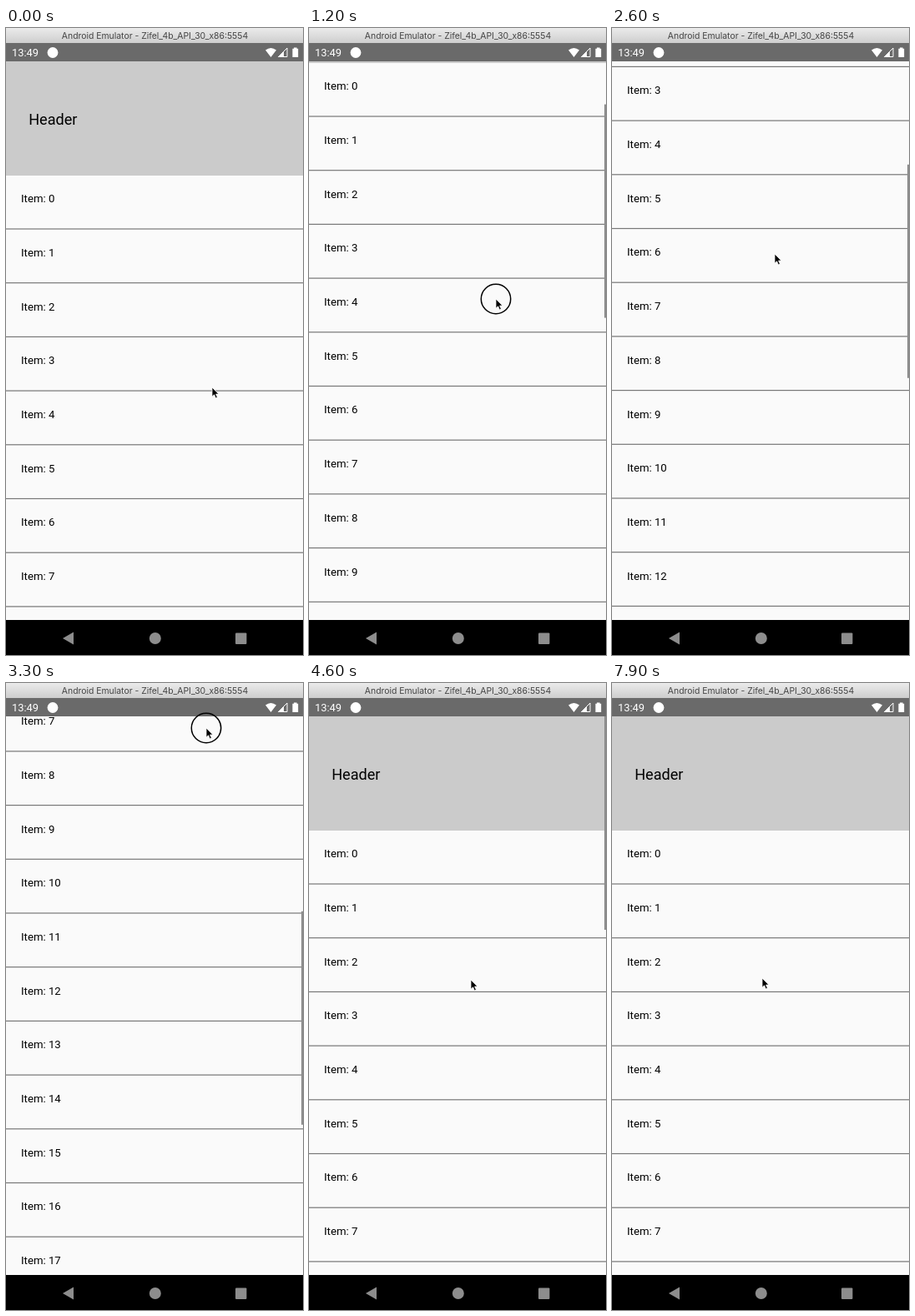
These frames come from a looping animation (356 px wide and 752 px high, 8000 ms). An HTML page:

```html
<!DOCTYPE html>
<html lang="en">
<head>
<meta charset="utf-8">
<title>List with header</title>
<style>
  html, body { margin: 0; width: 100%; height: 100%; overflow: hidden; background: #000; }
  svg { display: block; width: 356px; height: 752px; }
  text { font-family: Roboto, "Open Sans", sans-serif; }
</style>
</head>
<body>
<svg viewBox="0 0 356 752">
  <defs>
    <linearGradient id="chrome" x2="0" y2="1">
      <stop offset="0" stop-color="#ebebeb"/>
      <stop offset="1" stop-color="#cecece"/>
    </linearGradient>
    <clipPath id="view"><rect y="40" width="356" height="670"/></clipPath>
    <filter id="shadow" x="-30%" y="-30%" width="160%" height="160%">
      <feDropShadow dx="0" dy="0.8" stdDeviation="1.2" flood-opacity=".22"/>
    </filter>
  </defs>

  <g clip-path="url(#view)">
    <rect y="40" width="356" height="670" fill="#fafafa"/>
    <g id="content">
      <rect y="40" width="356" height="137" fill="#cbcbcb"/>
      <text x="27.2" y="115.6" font-size="18.1">Header</text>
    </g>
    <rect id="bar" x="354" width="2" height="256" fill="#8e8e8e"/>
    <g id="spinner">
      <circle r="18" fill="#fafafa" filter="url(#shadow)"/>
      <path id="arc" fill="none" stroke="#000" stroke-width="2.3"/>
    </g>
  </g>

  <rect width="356" height="18" fill="url(#chrome)"/>
  <text x="178.5" y="13" font-size="10.4" fill="#444" text-anchor="middle" style="font-family: Inter, sans-serif">Android Emulator - Zifel_4b_API_30_x86:5554</text>

  <rect y="18" width="356" height="22" fill="#6a6a6a"/>
  <g fill="#fff">
    <text x="7" y="34" font-size="12.9">13:49</text>
    <circle cx="56" cy="29.5" r="6.4"/>
    <path d="M317.5 35L311 26.6Q317.5 21.6 324 26.6Z"/>
    <path d="M326.5 34.5L337 24V34.5Z" fill="none" stroke="#fff"/>
    <path d="M326 35L333 28V35Z"/>
    <path d="M345 24.8V23.6h3.6v1.2h1.6V35h-6.8V24.8Z"/>
  </g>

  <rect y="710" width="356" height="42"/>
  <g fill="#8d8d8d">
    <path d="M68 732L81 724.6V739.4Z"/>
    <circle cx="178.8" cy="732" r="7"/>
    <rect x="275" y="725.5" width="13.4" height="13.4" rx="1"/>
  </g>

  <circle id="ring" fill="none" stroke="#000" stroke-width="1.5"/>
  <path id="cursor" d="M0 0V11.2L2.6 8.8L4.4 13L6.4 12.1L4.6 8.1H8Z" stroke="#fff" stroke-width=".8"/>
</svg>

<script>
const LOOP = 8000, STEP = 100, ROW = 64.7, ROWS = 25;
const $ = id => document.getElementById(id);
const set = (el, attrs) => { for (const k in attrs) el.setAttribute(k, attrs[k]); };
const clamp = v => Math.max(0, Math.min(1, v));
const ease = v => v * v * (3 - 2 * v);
const ramp = (t, from, to) => clamp((t - from) / (to - from));

// time, pointer x, pointer y, scroll offset
const track = [
  [300, 247, 431, 0],
  [900, 238, 289, 135],
  [1100, 224, 325, 135],
  [1200, 224, 325, 135],
  [1900, 208, 150, 308],
  [2250, 200, 225, 324],
  [2600, 195, 271, 324],
  [2800, 234, 349, 324],
  [3300, 240, 54, 612],
  [3400, 240, 54, 612],
  [4000, 222, 520, 146],
  [4300, 208, 430, 0],
  [4600, 194, 356, 0],
  [4900, 194, 356, 0],
  [5400, 222, 500, 0],
  [5600, 226, 500, 0],
  [6300, 231, 338, 0],
  [6500, 231, 338, 0],
  [6600, 217, 342, 0],
  [7000, 180, 354, 0],
];
const presses = [[100, 900], [1100, 1900], [2700, 4000], [4900, 5500]];

function pose(t) {
  const i = track.findIndex(k => k[0] > t);
  if (i === 0) return track[0].slice(1);
  if (i < 0) return track[track.length - 1].slice(1);
  const a = track[i - 1], b = track[i], p = ease(ramp(t, a[0], b[0]));
  return a.map((v, n) => v + (b[n] - v) * p).slice(1);
}

function arcPath(start, sweep, r = 8) {
  const point = turn => {
    const a = turn * 2 * Math.PI;
    return `${(r * Math.cos(a)).toFixed(2)} ${(r * Math.sin(a)).toFixed(2)}`;
  };
  return `M${point(start)}A${r} ${r} 0 ${sweep > .5 ? 1 : 0} 1 ${point(start + sweep)}`;
}

// Indeterminate ring: the head runs ahead, then the tail catches up.
function spinArc(t) {
  const turns = (t - 5834) / 1332, cycle = Math.floor(turns), p = turns - cycle;
  const head = ease(clamp(p * 2)), tail = ease(clamp(p * 2 - 1));
  const start = cycle * .79 + tail * .79 + turns * .21 - .005;
  return arcPath(start, .01 + .79 * (head - tail));
}

function drawSpinner(t) {
  const pull = ease(ramp(t, 4900, 5400)), size = 1 - ramp(t, 7500, 7700);
  const visible = t > 4950 && size > 0;
  set($('spinner'), {
    visibility: visible ? 'visible' : 'hidden',
    transform: `translate(178.8 ${159 + 57 * pull}) scale(${size})`,
  });
  set($('arc'), {
    d: t < 5500 ? arcPath(pull * .5 - .25, .01 + .79 * pull) : spinArc(t),
    opacity: t < 5500 ? .3 + .7 * pull : 1,
  });
}

function draw(t) {
  const [x, y, scroll] = pose(t);
  set($('content'), { transform: `translate(0 ${-scroll})` });
  set($('bar'), {
    y: 40 + scroll * .382,
    opacity: t < 400 ? 0 : 1 - ramp(t, 4800, 5100),
  });
  drawSpinner(t);
  set($('cursor'), { transform: `translate(${x} ${y})` });
  const press = presses.find(([from, to]) => t >= from && t < to);
  const grip = press ? ramp(t, press[0], press[0] + 100) : 0;
  set($('ring'), {
    cx: x, cy: y, r: 29 - 11.3 * grip,
    opacity: press ? .4 + .6 * grip : 0,
  });
}

for (let i = 0; i < ROWS; i++) {
  const top = 177 + i * ROW;
  $('content').insertAdjacentHTML('beforeend',
    `<text x="18" y="${top + 32.2}" font-size="13.2">Item: ${i}</text>
     <rect y="${top + 63.4}" width="356" height="1.2" fill="#777"/>`);
}

const begin = performance.now();
function tick() {
  const t = (performance.now() - begin) % LOOP;
  draw(Math.floor(t / STEP) * STEP);
  requestAnimationFrame(tick);
}
tick();
</script>
</body>
</html>
```
